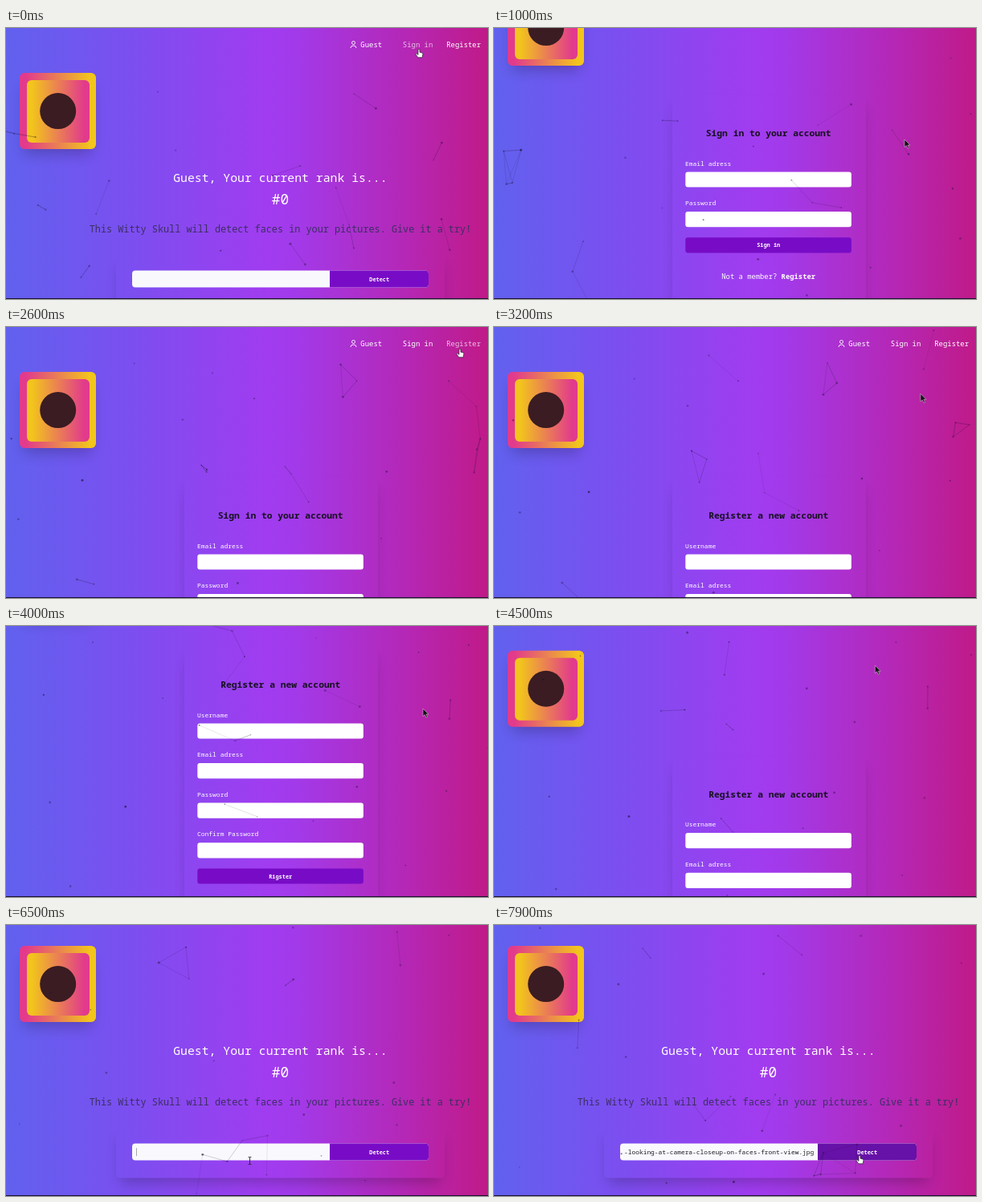
An HTML page for the animation above (8 s loop, 600 by 338 pixels).

```html
<!DOCTYPE html>
<html lang="en">
<head>
<meta charset="utf-8">
<title>Face detection app</title>
<style>
  html, body { margin: 0; width: 100%; height: 100%; overflow: hidden; background: #a03cf0; }
  svg { display: block; width: 100vw; height: 100vh; }
  text { font-family: "Noto Sans Mono", "DejaVu Sans Mono", monospace; fill: #fff; white-space: pre; }
</style>
</head>
<body>
<svg id="stage" viewBox="0 0 600 338">
  <defs>
    <linearGradient id="sky" gradientUnits="userSpaceOnUse" x1="0" y1="0" x2="600" y2="0">
      <stop offset="0" stop-color="#6161ee"/>
      <stop offset=".28" stop-color="#7e4df0"/>
      <stop offset=".54" stop-color="#a13cf0"/>
      <stop offset=".6" stop-color="#a23aea"/>
      <stop offset=".82" stop-color="#b428b8"/>
      <stop offset="1" stop-color="#c01a88"/>
    </linearGradient>
    <linearGradient id="warm">
      <stop offset=".08" stop-color="#e23a8c"/>
      <stop offset=".92" stop-color="#f2c51c"/>
    </linearGradient>
    <linearGradient id="warmBack">
      <stop offset=".08" stop-color="#f2c51c"/>
      <stop offset=".92" stop-color="#e23a8c"/>
    </linearGradient>
    <filter id="blur" filterUnits="userSpaceOnUse" x="-60" y="-60" width="720" height="780">
      <feGaussianBlur stdDeviation="8.5"/>
    </filter>
  </defs>
  <rect width="600" height="338" fill="url(#sky)"/>
  <g id="page">
    <g id="nav"></g>
    <g id="home"></g>
    <g id="signin"></g>
    <g id="register"></g>
  </g>
  <g id="dots"></g>
  <g id="cursor">
    <path id="arrow" d="M0 0V9.6L2.3 7.6L3.9 11.2L5.5 10.5L4 7H7Z" fill="#111" stroke="#ddd" stroke-width=".5"/>
    <path id="hand" d="M-1 1Q0-.6 1 1V4.2L4 5Q5 5.3 4.9 6.6L4.2 10.8H-1.2L-4 6.7Q-3.8 5.4-2.6 6.1L-1 7.4Z" fill="#fff" stroke="#222" stroke-width=".7" stroke-linejoin="round"/>
    <path id="beam" d="M-1.8-4.6H-.5L0-4L.5-4.6H1.8M0-4V4M-1.8 4.6H-.5L0 4L.5 4.6H1.8" fill="none" stroke="#222" stroke-width=".9"/>
  </g>
  <rect y="337" width="600" height="1" fill="#1a1030"/>
</svg>
<script>
const LOOP = 8000, STEP = 100;
const $ = id => document.getElementById(id);
const show = (id, on) => $(id).setAttribute('display', on ? 'inline' : 'none');

const text = (x, y, size, str, attrs = '') =>
  `<text x="${x}" y="${y}" font-size="${size}" ${attrs}>${str}</text>`;
const centered = (x, y, size, str, attrs = '') =>
  text(x, y, size, str, `text-anchor="middle" ${attrs}`);
const rect = (x, y, w, h, r, fill, attrs = '') =>
  `<rect x="${x}" y="${y}" width="${w}" height="${h}" rx="${r}" fill="${fill}" ${attrs}/>`;
const raised = (x, y, w, h, r, fill) =>
  rect(x + 5, y + 16, w - 10, h - 10, r, '#000', 'opacity=".22" filter="url(#blur)"') +
  rect(x, y, w, h, r, fill);

const PURPLE = '#780cc6';
const MID = 341.7;

function navMarkup() {
  return `<g fill="none" stroke="#fff" stroke-width=".9">
      <circle cx="432.5" cy="18.5" r="2"/><path d="M429.2 25V24.1Q429.4 22.1 432.5 22.1T435.8 24.1V25"/></g>` +
    text(441.3, 23.7, 8.95, 'Guest', 'font-weight="500"') +
    text(493.8, 23.7, 8.95, 'Sign in', 'font-weight="500" id="signinLink"') +
    text(548.2, 23.7, 8.95, 'Register', 'font-weight="500" id="registerLink"') +
    raised(17, 56.1, 95, 95, 6, 'url(#warm)') +
    rect(26, 65, 78, 78, 6, 'url(#warmBack)') +
    '<circle cx="64.7" cy="103.6" r="22.5" fill="#3a1c22"/>';
}

function homeMarkup() {
  return centered(341.4, 191.8, 14.8, 'Guest, Your current rank is...') +
    centered(341.5, 220.3, 17.8, '#0') +
    centered(341.5, 255.3, 11.84, 'This Witty Skull will detect faces in your pictures. Give it a try!',
      'style="fill:#3c2f63"') +
    raised(137, 281.6, 409, 64, 5, 'url(#sky)') +
    rect(157, 302.6, 369, 21, 4, '#f9f9fd') +
    `<path id="detect" d="M403 302.6H522Q526 302.6 526 306.6V319.6Q526 323.6 522 323.6H403Z"/>` +
    centered(464.7, 315.6, 6.9, 'Detect', 'font-weight="600"') +
    '<path id="caret" d="M162.5 308.2V318.2" stroke="#555" stroke-width=".5"/>' +
    text(398.3, 315.8, 7.88, '-looking-at-camera-closeup-on-faces-front-view.jpg',
      'text-anchor="end" id="address" style="fill:#1b1b22"');
}

function formMarkup(title, labels, action, footer) {
  const pitch = 49.6;
  const last = 283.4 + pitch * (labels.length - 1);
  return raised(222, 187, 241, last + 60, 5, 'url(#sky)') +
    centered(MID, 239, 11.3, title, 'font-weight="600" style="fill:#16101f"') +
    labels.map((label, i) =>
      text(238, 275.6 + pitch * i, 7.96, label, 'font-weight="500"') +
      rect(238.3, 283.4 + pitch * i, 206.6, 19.2, 3, '#fff')).join('') +
    rect(238.3, last + 32.2, 206.6, 19.2, 3, PURPLE) +
    centered(MID, last + 44.4, 6.9, action, 'font-weight="600"') +
    centered(MID, last + 83.8, 8.86, footer);
}

$('nav').innerHTML = navMarkup();
$('home').innerHTML = homeMarkup();
$('signin').innerHTML = formMarkup('Sign in to your account', ['Email adress', 'Password'],
  'Sign in', 'Not a member? <tspan font-weight="700">Register</tspan>');
$('register').innerHTML = formMarkup('Register a new account',
  ['Username', 'Email adress', 'Password', 'Confirm Password'], 'Rigster', '');

// Drifting particles
let seed = 41;
const random = () => (seed = (seed * 16807) % 2147483647) / 2147483647;
const particles = Array.from({ length: 27 }, () => ({
  x: random() * 600, y: random() * 338,
  vx: (random() - .5) * 80, vy: (random() - .5) * 80,
  r: .7 + random() * .8, alpha: .25 + random() * .4
}));
const wrap = (v, size) => ((v % size) + size) % size;

function particleMarkup(t) {
  const pts = particles.map(p => ({
    ...p,
    x: wrap(p.x + p.vx * t / 1000, 610) - 5,
    y: wrap(p.y + p.vy * t / 1000, 348) - 5
  }));
  const reach = 50;
  let out = '';
  pts.forEach((a, i) => {
    out += `<circle cx="${a.x}" cy="${a.y}" r="${a.r}" fill="#1c1030" opacity="${a.alpha}"/>`;
    for (const b of pts.slice(i + 1)) {
      const d = Math.hypot(a.x - b.x, a.y - b.y);
      if (d < reach) {
        out += `<path d="M${a.x} ${a.y}L${b.x} ${b.y}" stroke="#1c1030" stroke-width=".7" opacity="${.12 + .45 * (1 - d / reach)}"/>`;
      }
    }
  });
  return out;
}

// Keyframes: [time, ...values]
const scrollKeys = [[0, 0], [500, 0], [900, 104], [1700, 104], [2100, 0], [3200, 0],
  [3700, 162], [4200, 162], [4600, 0], [5600, 0], [6000, 30], [LOOP, 30]];
const cursorKeys = [[0, 514, 26], [300, 514, 26], [900, 511, 139], [1800, 511, 139],
  [2400, 565, 27], [2800, 565, 27], [3400, 519, 103], [4200, 519, 103], [4700, 450, 20],
  [4900, 450, 20], [5300, 447, 121.5], [5500, 447, 121.5], [6200, 303.5, 294],
  [7000, 303.5, 294], [7600, 455, 287], [LOOP, 455, 287]];

function sample(keys, t) {
  const i = Math.max(1, keys.findIndex(k => k[0] >= t));
  const [a, b] = [keys[i - 1], keys[i]];
  const u = (t - a[0]) / (b[0] - a[0]);
  const eased = u * u * (3 - 2 * u);
  return a.slice(1).map((v, n) => v + (b[n + 1] - v) * eased);
}

function render(t) {
  const page = t < 400 || t >= 4900 ? 'home' : t < 2800 ? 'signin' : 'register';
  for (const name of ['home', 'signin', 'register']) show(name, name === page);

  const [scroll] = sample(scrollKeys, t);
  const [x, y] = sample(cursorKeys, t);
  $('page').setAttribute('transform', `translate(0 ${-scroll})`);
  $('cursor').setAttribute('transform', `translate(${x} ${y})`);

  const py = y + scroll;
  const over = (x0, x1, y0, y1) => x >= x0 && x <= x1 && py >= y0 && py <= y1;
  const onSignin = over(492, 533, 12, 29);
  const onRegister = over(547, 592, 12, 29);
  const onDetect = page === 'home' && over(403, 526, 303, 324);
  const onInput = page === 'home' && over(157, 403, 303, 326);
  const onLink = onSignin || onRegister || onDetect || over(428, 470, 12, 29);

  $('signinLink').setAttribute('opacity', onSignin ? .7 : 1);
  $('registerLink').setAttribute('opacity', onRegister ? .7 : 1);
  $('detect').setAttribute('fill', onDetect ? '#6611a8' : PURPLE);
  show('hand', onLink);
  show('beam', onInput);
  show('arrow', !onLink && !onInput);

  show('caret', t >= 6300 && t < 7000 && (t - 6300) % 1000 < 500);
  show('address', t >= 7000);
  $('dots').innerHTML = particleMarkup(t);
}

const start = performance.now();
let shown = -1;
function tick() {
  const t = Math.floor(((performance.now() - start) % LOOP) / STEP) * STEP;
  if (t !== shown) render(shown = t);
  requestAnimationFrame(tick);
}
tick();
</script>
</body>
</html>
```
